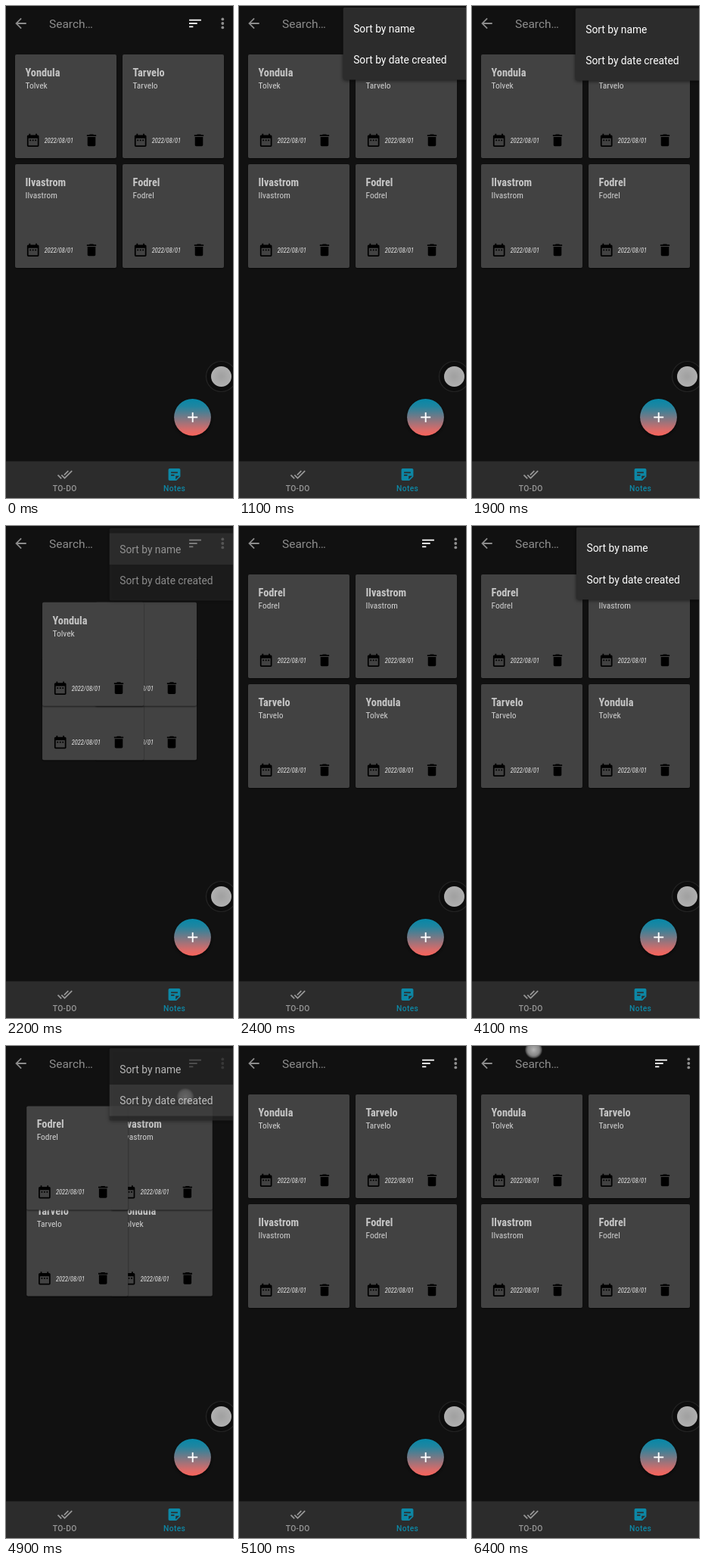
Write an HTML page with a canvas that moves like this. It is 300x650 px and loops after 6500 ms.

```html
<!DOCTYPE html>
<html lang="en">
<head>
<meta charset="utf-8">
<title>Notes sorting</title>
<style>
html, body { margin: 0; width: 100%; height: 100%; overflow: hidden; background: #111; }
canvas { display: block; width: 300px; height: 650px; }
</style>
</head>
<body>
<canvas id="stage"></canvas>
<script>
const LOOP = 6500;
const canvas = document.getElementById('stage');
const c = canvas.getContext('2d');
const ratio = window.devicePixelRatio || 1;
canvas.width = 300 * ratio;
canvas.height = 650 * ratio;

const SANS = 'Roboto, sans-serif';
const NARROW = '"Roboto Condensed", Roboto, sans-serif';

// Icons on a 24 unit grid
const icons = {
  back: 'M20 11H7.83l5.59-5.59L12 4l-8 8 8 8 1.41-1.41L7.83 13H20v-2z',
  sort: 'M3 18h6v-2H3v2zM3 6v2h18V6H3zm0 7h12v-2H3v2z',
  date: 'M9 11H7v2h2v-2zm4 0h-2v2h2v-2zm4 0h-2v2h2v-2zm2-7h-1V2h-2v2H8V2H6v2H5c-1.1 0-2 .9-2 2v14a2 2 0 0 0 2 2h14c1.1 0 2-.9 2-2V6c0-1.1-.9-2-2-2zm0 16H5V9h14v11z',
  trash: 'M6 19c0 1.1.9 2 2 2h8c1.1 0 2-.9 2-2V7H6v12zM19 4h-3.5l-1-1h-5l-1 1H5v2h14V4z',
  done: 'M18 7l-1.41-1.41-6.34 6.34 1.41 1.41L18 7zm4.24-1.41L11.66 16.17 7.48 12l-1.41 1.41L11.66 19l12-12-1.42-1.41zM.41 13.41L6 19l1.41-1.41L1.83 12 .41 13.41z',
  note: 'M19 3H5c-1.1 0-2 .9-2 2v14c0 1.1.9 2 2 2h10l6-6V5c0-1.1-.9-2-2-2zM7 8h10v2H7V8zm5 6H7v-2h5v2zm2 5.5V14h5.5L14 19.5z'
};
for (const name in icons) icons[name] = new Path2D(icons[name]);

const notes = [
  ['Yondula', 'Tolvek'],
  ['Tarvelo', 'Tarvelo'],
  ['Ilvastrom', 'Ilvastrom'],
  ['Fodrel', 'Fodrel']
];
const BY_NAME = 2117, BY_DATE = 4848;
const menus = [
  { open: 930, close: BY_NAME, row: 0, tap: 1950, x: 221 },
  { open: 3980, close: BY_DATE, row: 1, tap: 4690, x: 237 }
];
const touches = [
  { from: 520, to: 740, x: 249, y: 23 },
  { from: 1930, to: 2110, x: 221, y: 30 },
  { from: 3540, to: 3760, x: 249, y: 23 },
  { from: 4680, to: 4930, x: 237, y: 67 },
  { from: 6250, to: 6480, x: 81.5, y: 5 }
];

const clamp = v => Math.min(1, Math.max(0, v));
const ease = v => (1 - Math.cos(Math.PI * clamp(v))) / 2;

function text(str, x, y, font, color) {
  c.font = font;
  c.fillStyle = color;
  c.fillText(str, x, y);
}

function icon(name, x, y, scale, color) {
  c.save();
  c.translate(x - 12 * scale, y - 12 * scale);
  c.scale(scale, scale);
  c.fillStyle = color;
  c.fill(icons[name]);
  c.restore();
}

function disc(x, y, r, fill) {
  c.beginPath();
  c.arc(x, y, r, 0, 2 * Math.PI);
  c.fillStyle = fill;
  c.fill();
}

function box(x, y, w, h, r, fill) {
  c.beginPath();
  c.roundRect(x, y, w, h, r);
  c.fillStyle = fill;
  c.fill();
}

function shadow(blur, dy) {
  c.shadowColor = 'rgba(0,0,0,.6)';
  c.shadowBlur = blur;
  c.shadowOffsetY = dy;
}

function topBar() {
  icon('back', 19.5, 23, 0.9, '#8c8c8c');
  text('Search…', 57, 29, '15.5px ' + SANS, '#8c8c8c');
  icon('sort', 250, 23, 0.88, '#fff');
  for (const y of [17.4, 23, 28.4]) disc(286.3, y, 1.9, '#8f8f8f');
}

function card([title, body], x, y) {
  c.save();
  shadow(2, 1);
  box(x, y, 134, 137, 2, '#424242');
  c.restore();
  text(title, x + 13.5, y + 29, 'bold condensed 14.3px ' + NARROW, '#c6c6c6');
  text(body, x + 13.5, y + 45, 'condensed 11.5px ' + NARROW, '#d0d0d0');
  icon('date', x + 23.7, y + 113.4, 0.87, '#000');
  text('2022/08/01', x + 38.8, y + 117, 'italic condensed 8.4px ' + NARROW, '#e4e4e4');
  icon('trash', x + 101, y + 113.4, 0.88, '#000');
}

// Reversing the order sends every card to the opposite corner
function cards(t) {
  const p = ease((t - BY_NAME) / 250) - ease((t - BY_DATE) / 250);
  const byName = t >= BY_NAME && t < BY_DATE;
  for (let n = 0; n < 4; n++) {
    const i = byName ? 3 - n : n;
    const mix = (a, b) => a + (b - a) * p;
    const col = mix(i % 2, 1 - i % 2), row = mix(i >> 1, 1 - (i >> 1));
    card(notes[i], 12 + 142 * col, 64 + 145 * row);
  }
}

function addButton() {
  const g = c.createLinearGradient(0, 519, 0, 568);
  g.addColorStop(0, '#0688a8');
  g.addColorStop(0.2, '#1f85a0');
  g.addColorStop(0.85, '#dd6a67');
  g.addColorStop(1, '#f9635a');
  c.save();
  shadow(5, 2);
  disc(246.5, 543.3, 24.4, g);
  c.restore();
  c.fillStyle = '#fff';
  c.fillRect(240.2, 542.4, 13, 1.9);
  c.fillRect(245.75, 536.9, 1.9, 13);
}

function tabs() {
  c.fillStyle = '#2c2c2c';
  c.fillRect(0, 601.5, 300, 48.5);
  icon('done', 77.8, 619, 0.86, '#979797');
  icon('note', 222.5, 619, 0.88, '#0d87a5');
  c.textAlign = 'center';
  c.letterSpacing = '0.3px';
  text('TO-DO', 77.7, 641.3, '500 10.3px ' + SANS, '#979797');
  text('Notes', 222.6, 641.3, '500 10.3px ' + SANS, '#0d87a5');
  c.letterSpacing = '0px';
  c.textAlign = 'left';
}

function menu(m, t) {
  const alpha = clamp((t - m.open) / 100) * (1 - clamp((t - m.close) / 165));
  if (!alpha) return;
  const shift = 2.2 * (1 - clamp((t - m.open) / 300));
  c.save();
  c.globalAlpha = alpha;
  c.translate(136.7 + shift, 3 - shift);
  c.save();
  shadow(5, 1);
  box(0, 0, 170, 95.5, 2, '#2c2c2c');
  c.restore();
  if (t > m.tap) {
    c.save();
    c.beginPath();
    c.rect(0, 6.5 + 41.5 * m.row, 170, 41.5);
    c.clip();
    disc(m.x - 137, 27 + 41.5 * m.row, 20 + (t - m.tap) * 0.7, 'rgba(255,255,255,.14)');
    c.restore();
  }
  text('Sort by name', 13.5, 32.5, '13.8px ' + SANS, '#fff');
  text('Sort by date created', 13.5, 74, '13.8px ' + SANS, '#fff');
  c.restore();
}

function touch({ from, to, x, y }, t) {
  const alpha = clamp((t - from) / 60) * clamp((to - t) / 80);
  if (!alpha) return;
  const g = c.createRadialGradient(x, y, 0, x, y, 12);
  g.addColorStop(0, 'rgba(225,225,225,.8)');
  g.addColorStop(0.65, 'rgba(200,200,200,.65)');
  g.addColorStop(0.82, 'rgba(170,170,170,.5)');
  g.addColorStop(1, 'rgba(120,120,120,0)');
  c.globalAlpha = alpha;
  disc(x, y, 12, g);
  c.globalAlpha = 1;
}

function floatingBall() {
  disc(284.5, 489.5, 20, '#0d0d0d');
  c.strokeStyle = '#252525';
  c.lineWidth = 1.2;
  c.stroke();
  const g = c.createRadialGradient(284.5, 489.5, 2, 284.5, 489.5, 13.5);
  g.addColorStop(0, '#a2a2a2');
  g.addColorStop(1, '#b0b0b0');
  disc(284.5, 489.5, 13.5, g);
}

function draw(now) {
  const t = now % LOOP;
  c.setTransform(ratio, 0, 0, ratio, 0, 0);
  c.fillStyle = '#111';
  c.fillRect(0, 0, 300, 650);
  topBar();
  cards(t);
  addButton();
  tabs();
  menus.forEach(m => menu(m, t));
  touches.forEach(p => touch(p, t));
  floatingBall();
}

const start = performance.now();
function tick() {
  draw(performance.now() - start);
  requestAnimationFrame(tick);
}
tick();
</script>
</body>
</html>
```
